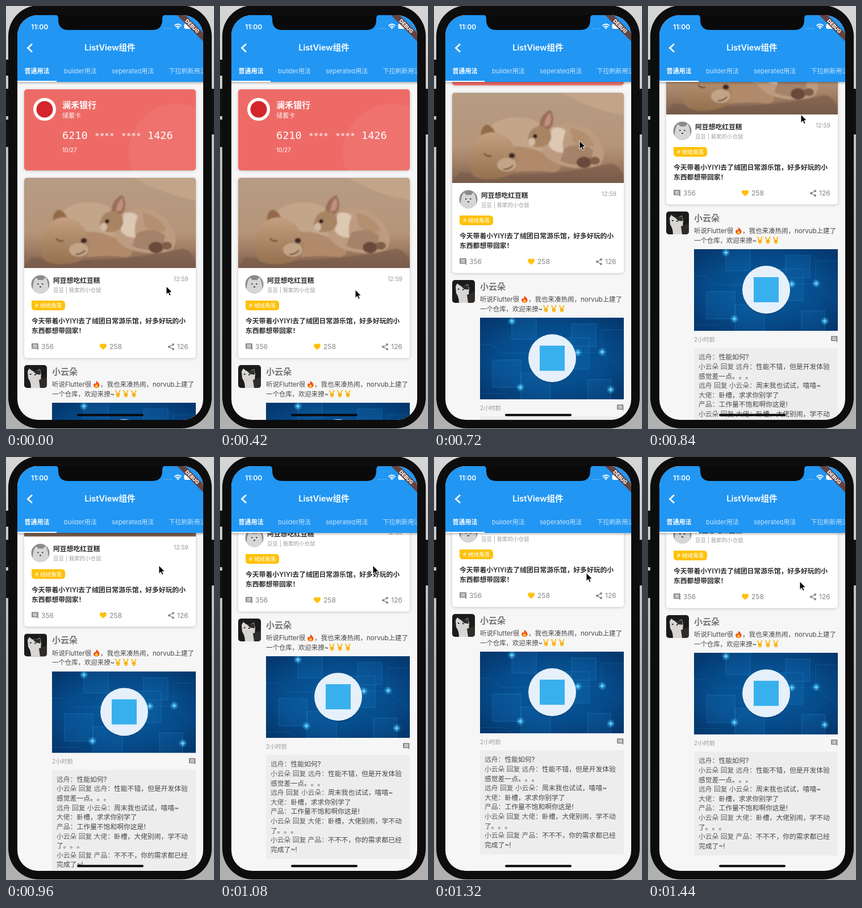
Write an HTML page that moves like this. It is 366 by 741 pixels and loops after 1500 ms.

```html
<!DOCTYPE html>
<html lang="zh-CN">
<head>
<meta charset="utf-8">
<title>ListView</title>
<style>
html, body { margin: 0; width: 100%; height: 100%; overflow: hidden; background: #c9c9c9; }
svg { display: block; }
text { font-family: Inter, "Noto Sans CJK SC", "Noto Sans CJK", sans-serif; white-space: pre; text-spacing-trim: space-all; }
.mono { font-family: "DejaVu Sans Mono", monospace; }
</style>
</head>
<body>
<svg width="366" height="741" viewBox="0 0 366 741">
  <defs>
    <clipPath id="screen"><rect x="20" y="16" width="327" height="709" rx="36"/></clipPath>
    <clipPath id="bank"><rect x="32" y="146" width="302" height="142" rx="5"/></clipPath>
    <clipPath id="photo"><path d="M32 459V306q0-5 5-5H329q5 0 5 5V459Z"/></clipPath>
    <clipPath id="round"><circle cx="60.5" cy="487.5" r="16"/></clipPath>
    <clipPath id="square"><rect x="32" y="629" width="40" height="40" rx="5"/></clipPath>
    <clipPath id="banner"><rect x="81" y="695" width="253" height="143"/></clipPath>
    <linearGradient id="desk" x2="0" y2="1">
      <stop stop-color="#d6d6d6"/><stop offset=".5" stop-color="#b4b4b4"/><stop offset="1" stop-color="#b0b0b0"/>
    </linearGradient>
    <linearGradient id="wall" x2="0" y2="1">
      <stop stop-color="#b69c84"/><stop offset=".6" stop-color="#b59579"/>
      <stop offset=".78" stop-color="#a27f65"/><stop offset="1" stop-color="#7c5f4c"/>
    </linearGradient>
    <linearGradient id="fur" x2="0" y2="1">
      <stop stop-color="#c4a080"/><stop offset="1" stop-color="#94704f"/>
    </linearGradient>
    <radialGradient id="sea" r=".65">
      <stop stop-color="#075c9f"/><stop offset=".6" stop-color="#064b8a"/><stop offset="1" stop-color="#05386e"/>
    </radialGradient>
    <radialGradient id="glow">
      <stop stop-color="#4fc8ff" stop-opacity=".8"/><stop offset="1" stop-color="#4fc8ff" stop-opacity="0"/>
    </radialGradient>
    <linearGradient id="shade" x2="0" y2="1">
      <stop stop-opacity=".28"/><stop offset="1" stop-opacity="0"/>
    </linearGradient>
    <filter id="lift" x="-5%" y="-5%" width="110%" height="112%">
      <feDropShadow dx="0" dy="1" stdDeviation="2.5" flood-opacity=".22"/>
    </filter>
    <filter id="soft"><feGaussianBlur stdDeviation="1.2"/></filter>
    <g id="bubble"><path d="M1 0H11q1 0 1 1V12L9.6 9.6H1q-1 0-1-1V1q0-1 1-1Z" fill="#8c8c8c"/>
      <path d="M2.4 2.7H9.6M2.4 4.8H9.6M2.4 6.9H9.6" stroke="#fff" stroke-width="1"/></g>
    <g id="hand" fill="#fbc02d"><path d="M2 1L4.5 6M9.5 .8L7 6" stroke="#fbc02d" stroke-width="2.2" stroke-linecap="round"/>
      <path d="M2.6 5.5H9q1.2 3.6-.8 6.8H4Q1.6 9 2.6 5.5Z"/><path d="M4 8Q6 6.8 8.4 8" fill="none" stroke="#d98b13"/></g>
    <g id="spark"><circle r="8" fill="url(#glow)"/><path d="M0-5L1.2-1.2L5 0L1.2 1.2L0 5L-1.2 1.2L-5 0L-1.2-1.2Z" fill="#5dd0ff"/></g>
  </defs>

  <rect width="366" height="741" fill="url(#desk)"/>
  <path d="M0 94H6V122H0ZM0 145H6V193H0ZM0 199H6V247H0ZM360 145H366V225H360Z" fill="#111"/>
  <rect x="4" y="-1" width="358" height="741" rx="54" fill="#0d0d0d"/>

  <g clip-path="url(#screen)">
    <rect x="20" y="16" width="327" height="709" fill="#f6f6f7"/>
    <g id="list">
      <rect x="32" y="146" width="302" height="142" rx="5" fill="#ee6a66" filter="url(#lift)"/>
      <circle cx="302" cy="257" r="86" fill="#fff" opacity=".05" clip-path="url(#bank)"/>
      <circle cx="68" cy="181" r="20" fill="#fff"/>
      <circle cx="68" cy="181" r="14.5" fill="#d4252b"/>
      <g id="bankText" fill="#fff"></g>

      <rect x="32" y="301" width="302" height="315.5" rx="5" fill="#fff" filter="url(#lift)"/>
      <g clip-path="url(#photo)">
        <rect x="32" y="301" width="302" height="158" fill="url(#wall)"/>
        <g filter="url(#soft)">
          <path d="M225 301H334V340Q280 332 225 301Z" fill="#c8aa8a" opacity=".7"/>
          <path d="M45 440Q180 455 310 425Q334 430 334 459H32Z" fill="#76594a" opacity=".6"/>
          <path d="M92 372Q105 343 150 344Q195 345 203 385Q206 425 170 432L110 425Z" fill="#c3a68a"/>
          <path d="M140 395Q185 395 222 424Q226 438 210 440Q180 436 140 440Z" fill="#b08a6b"/>
          <path d="M82 378Q83 359 93 357Q104 359 109 375Z" fill="#94694a"/>
          <path d="M62 418Q66 372 102 370Q137 372 146 410Q152 435 132 446Q96 459 70 447Q60 438 62 418Z" fill="url(#fur)"/>
          <ellipse cx="128" cy="427" rx="17" ry="12" fill="#c3a486"/>
          <ellipse cx="137" cy="411" rx="5.5" ry="4.500" fill="#3e2c25"/>
          <path d="M88 407Q94 414 101 411M122 435Q132 436 139 428" fill="none" stroke="#5b4030" stroke-width="2"/>
          <path d="M195 368Q245 338 281 372Q309 402 293 427Q255 440 215 425Q188 412 187 388Z" fill="#bd9b80"/>
          <path d="M207 364Q222 358 232 368Q224 386 228 406Q210 406 202 394Z" fill="#dcc8b3"/>
          <path d="M230 398Q258 385 280 402L276 424Q245 432 222 420Z" fill="#a5826a"/>
          <path d="M240 362Q275 370 282 394Q262 400 244 386Z" fill="#a9845f" opacity=".5"/>
          <path d="M185 366Q184 341 204 331Q213 341 208 358L199 370Z" fill="#97705a"/>
          <path d="M194 360Q194 346 204 336Q209 346 203 358Z" fill="#c48f7e"/>
          <path d="M165 382Q168 360 188 359Q208 364 206 382Q198 398 178 396Q166 393 165 382Z" fill="#a98464"/>
          <ellipse cx="172" cy="387" rx="6" ry="7" fill="#d3bca4"/>
          <circle cx="178" cy="377" r="3.600" fill="#2b1e1a"/>
          <ellipse cx="264" cy="423" rx="13" ry="10" fill="#694a3a"/>
          <ellipse cx="283" cy="420" rx="9" ry="7" fill="#7e5d48"/>
        </g>
      </g>
      <g clip-path="url(#round)">
        <rect x="44" y="471" width="33" height="33" fill="#8b8b8b"/>
        <path d="M47 504Q46 482 53 476L57 480H65L70 475Q77 490 73 504Z" fill="#d6d6d6"/>
        <path d="M55 487h2.500M63 487h2.500M59 492h3" stroke="#444" stroke-width="2"/>
      </g>
      <path d="M45 516H98q6 0 6 6v5q0 6-6 6H51q-6 0-6-6Z" fill="#ffc107"/>
      <use href="#bubble" x="45" y="591"/>
      <path transform="translate(163.800 589.600) scale(.6)" d="M12 21.350L10.550 20C5.400 15.360 2 12.280 2 8.500 2 5.420 4.420 3 7.500 3 9.240 3 10.910 3.810 12 5.090 13.090 3.810 14.760 3 16.500 3 19.580 3 22 5.420 22 8.500 22 12.280 18.600 15.360 13.450 20Z" fill="#ffc107"/>
      <g fill="#858585"><path d="M294 593L287 597L294 601" fill="none" stroke="#858585" stroke-width="1.3"/>
        <circle cx="294" cy="593" r="2"/><circle cx="287" cy="597" r="2"/><circle cx="294" cy="601" r="2"/></g>
      <g id="postText"></g>

      <g clip-path="url(#square)">
        <rect x="32" y="629" width="40" height="40" fill="#1b1b1c"/>
        <path d="M38 640L41 635L46 639H54L60 636L62 646Q60 654 64 669H44Q44 659 39 652Z" fill="#d8d6d3"/>
        <path d="M47 639H55L60 637L61 646L53 645ZM58 655L72 650V669H60Z" fill="#2f2c2a"/>
        <path d="M42 645h2.500M50 646h2.500" stroke="#222" stroke-width="2"/>
      </g>
      <path d="M158.800 656.500Q165 661 164.500 665Q163.500 669 159 669Q154 668.500 154 664Q154.500 662 156 660.500L157 662.500Q159.400 660 158.800 656.500Z" fill="#f4511e"/>
      <path d="M159.500 662.500Q162.500 665 161.800 667Q159 669.600 156.600 667Q156.500 664.500 159.500 662.500Z" fill="#ffca28"/>
      <use href="#hand" x="191" y="673"/><use href="#hand" x="205" y="673"/><use href="#hand" x="219" y="673"/>

      <g clip-path="url(#banner)">
        <rect x="81" y="695" width="253" height="143" fill="url(#sea)"/>
        <g fill="#2796dc" fill-opacity=".1" stroke="#36a7ea" stroke-opacity=".38" stroke-width=".7">
          <path d="M137 694H180V733H137ZM220 730H273V785H220ZM103 769H153V817H103ZM153 792H205V840H153ZM270 803H311V842H270ZM242 706H285V745H242Z"/>
          <path d="M81 742H103L118 757H166M253 756H295L334 790M152 817L170 799M295 755V716H334M81 828H125L137 838" fill="none" stroke-dasharray="3 1.5"/>
        </g>
        <use href="#spark" x="137" y="701"/><use href="#spark" x="253" y="756"/><use href="#spark" x="296" y="755"/>
        <use href="#spark" x="152" y="817"/><use href="#spark" x="311" y="821"/>
        <circle cx="208" cy="768" r="42" fill="#043363" opacity=".4"/>
        <circle cx="208" cy="766" r="42" fill="#e5f0fa"/>
        <rect x="186" y="744" width="44" height="44" fill="#39b0ee"/>
      </g>
      <use href="#bubble" transform="translate(322 847) scale(.95)"/>
      <rect x="81" y="868" width="253" height="182" fill="#ededee"/>
      <g id="chatText"></g>
    </g>

    <rect x="20" y="132" width="327" height="6" fill="url(#shade)"/>
    <rect x="20" y="16" width="327" height="117" fill="#2196f3"/>
    <path d="M46 66.5L38.5 73.5L46 80.5" fill="none" stroke="#fff" stroke-width="2.8"/>
    <rect x="20" y="131" width="69" height="2" fill="#fff"/>
    <g id="barText" fill="#fff"></g>
    <g fill="#fff" opacity=".4"><circle cx="279" cy="39.5" r=".9"/><circle cx="283" cy="39.5" r=".9"/><circle cx="287" cy="39.5" r=".9"/><circle cx="291" cy="39.5" r=".9"/></g>
    <path d="M296.5 34.5Q302.5 29 308.5 34.5M298.7 37Q302.5 33.5 306.3 37" fill="none" stroke="#fff" stroke-width="1.7"/>
    <path d="M300.3 38.3Q302.5 36.4 304.7 38.3L302.5 40.6Z" fill="#fff"/>
    <rect x="313.5" y="31" width="16.5" height="9" rx="2.5" fill="#fff"/>
    <rect x="330.7" y="34" width="1.3" height="3" fill="#fff"/>
    <g transform="translate(347 16) rotate(45)">
      <rect x="-50" y="22" width="100" height="10.5" fill="#64423f"/>
      <text y="30.4" font-size="8.8" font-weight="800" fill="#fff" text-anchor="middle">DEBUG</text>
    </g>
    <path d="M86 15Q92 16 92 22V24Q92 42 110 42H257Q275 42 275 24V22Q275 16 281 15Z" fill="#0a0a0a"/>
    <rect x="125" y="714.5" width="117" height="4" rx="2" fill="#08090c"/>
  </g>
  <path id="arrow" d="M0 0V14.5L3.4 11.4L5.7 16.6L8.1 15.6L5.9 10.5H10.4Z" fill="#000" stroke="#fff" stroke-width="1"/>
</svg>
<script>
const $ = id => document.getElementById(id);

// Each row: x, vertical centre, size, text, extra attributes
function write(id, rows) {
  $(id).innerHTML = rows.map(([x, y, size, str, extra = '']) =>
    `<text x="${x}" y="${y + size * 0.37}" font-size="${size}" ${extra}>${str}</text>`).join('');
}

const bold = 'font-weight="600"', dim = 'opacity=".75"';
const grey = 'fill="#9a9a9a"', count = 'fill="#858585"', ink = 'fill="#2b2b2b" font-weight="600"', body = 'fill="#484848"';

write('barText', [
  [44, 36, 12.2, '11:00', bold],
  [183, 73, 14.6, 'ListView组件', 'font-weight="600" text-anchor="middle"'],
  [32.5, 113.5, 11, '普通用法', bold],
  [102, 113.5, 11, 'builder用法', dim],
  [186, 113.5, 11, 'seperated用法', dim],
  [286.5, 113.5, 11, '下拉刷新用法', dim]
]);
write('bankText', [
  [99, 173, 15, '澜禾银行', bold],
  [99, 192, 11, '储蓄卡', 'opacity=".85"'],
  [99, 226.5, 18.5, '6210', 'class="mono"'],
  [156, 227, 14.4, '****', 'class="mono"'],
  [203, 227, 14.4, '****', 'class="mono"'],
  [249, 226.5, 18.5, '1426', 'class="mono"'],
  [99, 252, 10, '10/27']
]);
write('postText', [
  [83, 480.5, 11.8, '阿豆想吃红豆糕', ink],
  [83, 497, 9.5, '豆豆 | 我家的小仓鼠', grey],
  [321, 478, 10.3, '12:59', grey + ' text-anchor="end"'],
  [51, 524.5, 9.6, '# 绒绒角落', 'fill="#fff"'],
  [45, 552, 11.8, '今天带着小YIYI去了绒团日常游乐馆，好多好玩的小', ink],
  [45, 569, 11.8, '东西都想带回家！', ink],
  [62, 597, 12, '356', count],
  [182, 597, 12, '258', count],
  [301, 597, 12, '126', count]
]);

const chat = [
  ['远舟：', '性能如何?'],
  ['小云朵 回复 远舟：', '性能不错，但是开发体验'],
  ['', '感觉差一点。。。'],
  ['远舟 回复 小云朵：', '周末我也试试，嘻嘻~'],
  ['大佬：', '卧槽，求求你别学了'],
  ['产品：', '工作量不饱和啊你这是!'],
  ['小云朵 回复 大佬：', '卧槽，大佬别闹，学不动'],
  ['', '了。。。'],
  ['小云朵 回复 产品：', '不不不，你的需求都已经'],
  ['', '完成了~!']
];
write('chatText', [
  [81, 640, 15, '小云朵', 'fill="#757575" font-weight="600"'],
  [81, 663, 11.5, '听说Flutter很', body],
  [166, 663, 11.5, '，我也来凑热闹，norvub上建了', body],
  [81, 679.5, 11.4, '一个仓库，欢迎来撩~', body],
  [81, 853, 10.2, '2小时前', grey],
  ...chat.map(([who, said], i) =>
    [89, 884 + i * 16.62, 11.8, `<tspan fill="#5e5e5e">${who}</tspan>${said}`, body])
]);

// Time, scroll offset, pointer x, pointer y
const keys = [
  [0, 0, 282, 491], [420, 0, 238, 497], [540, 0, 239, 432], [600, 18, 243, 372],
  [660, 80, 249, 306], [720, 149, 256, 236], [780, 218, 264, 205], [840, 269, 269, 190],
  [900, 299, 269, 190], [960, 319.5, 269, 190], [1020, 335, 269, 190], [1080, 346, 269, 190],
  [1140, 354, 269, 190], [1200, 356.5, 269, 190], [1320, 354, 268, 203], [1440, 352, 267, 218]
];
const loop = 1500, step = 60;

function pose(t) {
  const i = Math.max(1, keys.findIndex(k => k[0] >= t));
  const a = keys[i - 1], b = keys[i], p = (t - a[0]) / (b[0] - a[0]);
  return a.map((v, n) => v + (b[n] - v) * p);
}

function draw() {
  const t = Math.floor(performance.now() % loop / step) * step;
  const [, scroll, x, y] = pose(t);
  $('list').setAttribute('transform', `translate(0 ${-scroll})`);
  $('arrow').setAttribute('transform', `translate(${x} ${y})`);
  requestAnimationFrame(draw);
}
draw();
</script>
</body>
</html>
```
